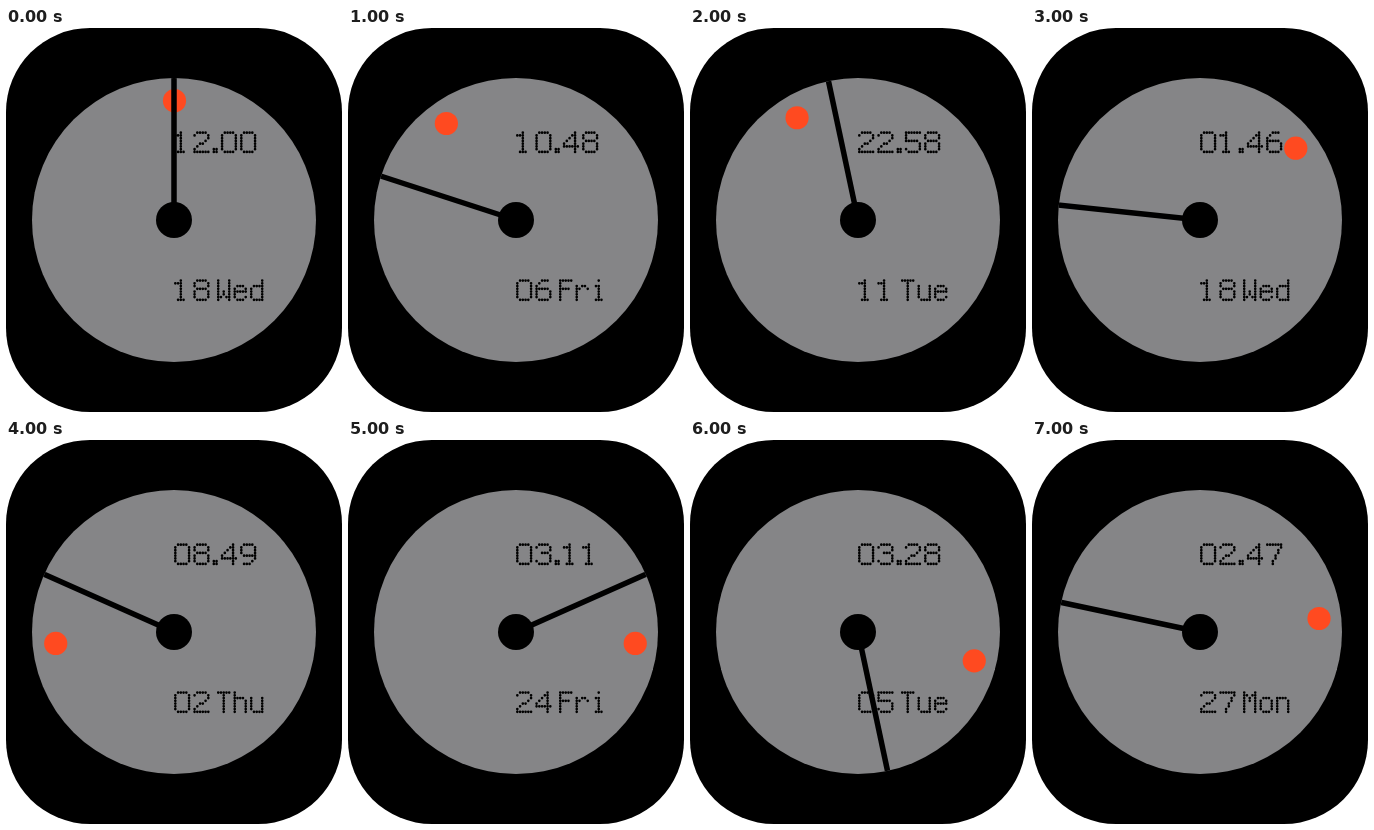
An HTML page that plays this animation: 336 px wide and 384 px high, repeating every 8000 ms.

```html
<!DOCTYPE html>
<html lang="en">
<head>
<meta charset="utf-8">
<title>Dot watch</title>
<style>
html, body { margin: 0; width: 100%; height: 100%; overflow: hidden; background: #fff; }
svg { display: block; width: 336px; height: 384px; }
</style>
</head>
<body>
<svg viewBox="0 0 336 384" role="img" aria-label="Watch face">
  <defs><clipPath id="dial"><circle cx="168" cy="192" r="142"/></clipPath></defs>
  <rect width="336" height="384" rx="84"/>
  <circle cx="168" cy="192" r="142" fill="#858587"/>
  <circle id="hour" r="11.6" fill="#ff4a20"/>
  <path id="time"/>
  <path id="date"/>
  <g clip-path="url(#dial)">
    <path id="minute" d="M168 192V48" stroke="#000" stroke-width="5.5"/>
  </g>
  <circle cx="168" cy="192" r="18"/>
</svg>
<script>
const PITCH = 2.75, DOT = 1.32, STEP = 1000;

// Dot-matrix glyphs: eight rows each, blank columns set by the advance.
const glyphs = {
  0: ' ####/#    #/#    #/#    #/#    #/#    #/#    #/ ####',
  1: '  #/###/  #/  #/  #/  #/  #/ ###',
  2: ' ####/#    #/     #/    #/  ##/ #/#/######',
  3: ' ####/#    #/     #/  ###/     #/     #/#    #/ ####',
  4: '    #/   ##/  # #/ #  #/#   #/######/    #/    #',
  5: '######/#/#/#####/     #/     #/#    #/ ####',
  6: '  ###/ #/#/#####/#    #/#    #/#    #/ ####',
  7: '######/     #/    #/    #/   #/   #/  #/  #',
  8: ' ####/#    #/#    #/ ####/#    #/#    #/#    #/ ####',
  9: ' ####/#    #/#    #/#    #/ #####/     #/    #/ ###',
  '.': '//////##/##',
  W: '#   #/#   #/#   #/#   #/# # #/# # #/## ##/#   #',
  T: '#####/  #/  #/  #/  #/  #/  #/  #',
  M: '#   #/## ##/# # #/# # #/#   #/#   #/#   #/#   #',
  F: '#####/#/#/####/#/#/#/#',
  e: '// ###/#   #/#####/#/#   #/ ###',
  d: '    #/    #/ ####/#   #/#   #/#   #/#   #/ ####',
  u: '//#   #/#   #/#   #/#   #/#   #/ ####',
  h: '#/#/####/#   #/#   #/#   #/#   #/#   #',
  o: '// ###/#   #/#   #/#   #/#   #/ ###',
  n: '//####/#   #/#   #/#   #/#   #/#   #',
  r: '//# ##/##  #/#/#/#/#',
  i: '  #// ##/  #/  #/  #/  #/ ###'
};

// Hour, minute and date of each reading.
const readings = [
  [12, 0, '18 Wed'], [10, 48, '06 Fri'], [22, 58, '11 Tue'], [1, 46, '18 Wed'],
  [8, 49, '02 Thu'], [3, 11, '24 Fri'], [3, 28, '05 Tue'], [2, 47, '27 Mon']
];

const el = id => document.getElementById(id);
const pad = n => String(n).padStart(2, '0');

function advance(c) {
  if (c === ' ') return 1.6;
  if (c === '.') return 3;
  return c >= '0' && c <= '9' ? 7 : 6;
}

function dots(text, x, y) {
  let d = '';
  for (const c of text) {
    (glyphs[c] || '').split('/').forEach((row, r) => {
      [...row].forEach((cell, k) => {
        if (cell !== '#') return;
        const px = x + k * PITCH, py = y + (r + .5) * PITCH;
        d += `M${px} ${py}a${DOT} ${DOT} 0 1 0 ${2 * DOT} 0a${DOT} ${DOT} 0 1 0 ${-2 * DOT} 0`;
      });
    });
    x += advance(c) * PITCH;
  }
  return d;
}

let shown = -1;

function draw(ms) {
  const i = Math.floor(ms / STEP) % readings.length;
  if (i === shown) return;
  shown = i;
  const [h, m, day] = readings[i];
  const a = (h * 30 + m / 2) * Math.PI / 180;
  el('hour').setAttribute('cx', 168.5 + 119.3 * Math.sin(a));
  el('hour').setAttribute('cy', 192 - 119.3 * Math.cos(a));
  el('minute').setAttribute('transform', `rotate(${m * 6} 168 192)`);
  el('time').setAttribute('d', dots(pad(h) + '.' + pad(m), 168, 103.3));
  el('date').setAttribute('d', dots(day, 168, 251.2));
}

const start = performance.now();
function tick() {
  draw(performance.now() - start);
  requestAnimationFrame(tick);
}
draw(0);
requestAnimationFrame(tick);
</script>
</body>
</html>
```
